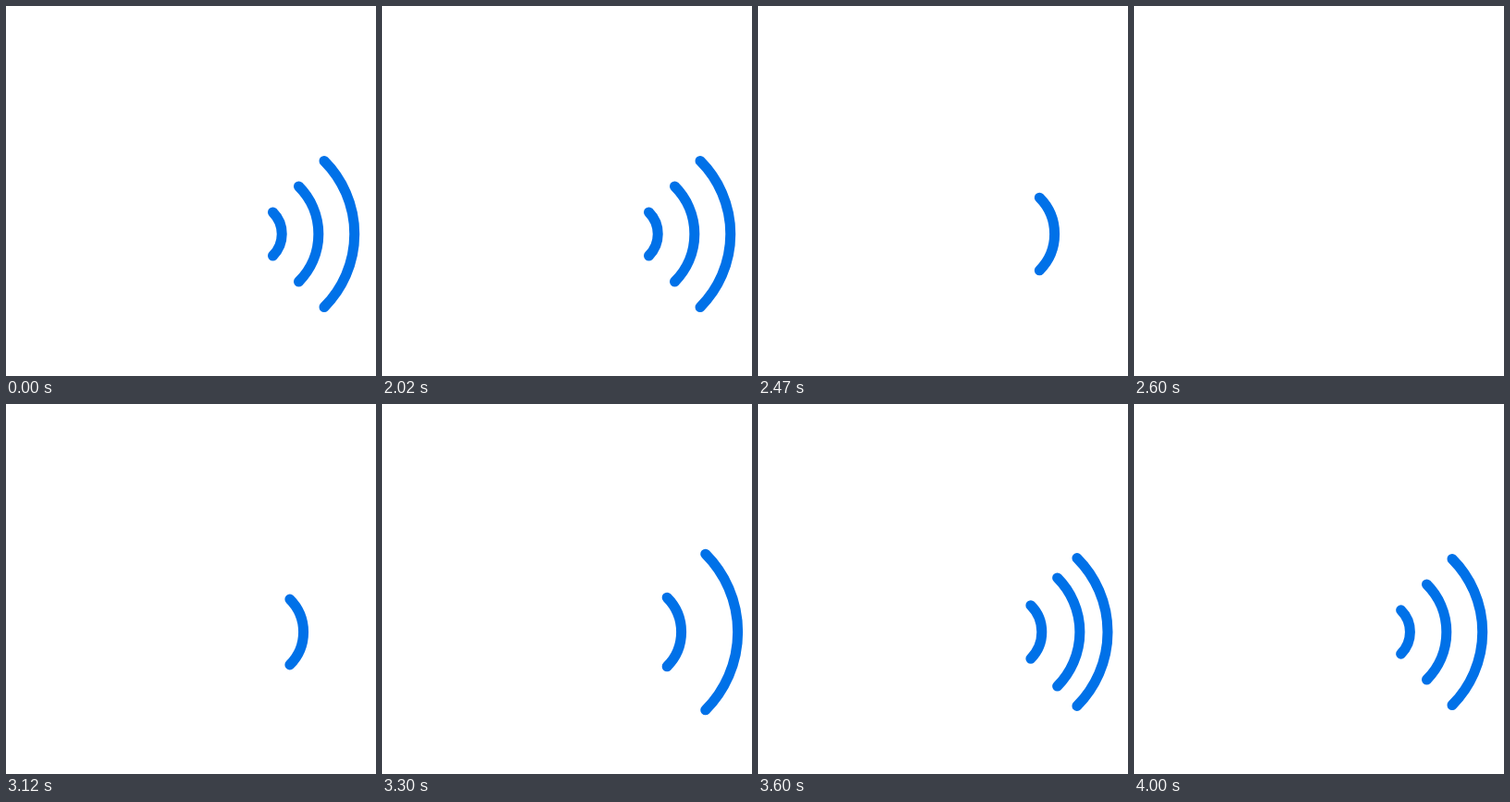
An HTML page that plays this animation: 400x400 px, repeating every 4020 ms.

```html
<!DOCTYPE html>
<html lang="en">
<head>
<meta charset="utf-8">
<title>Signal waves</title>
<style>
  html, body { margin: 0; width: 100%; height: 100%; overflow: hidden; background: #fff; }
  svg { display: block; width: 100%; height: 100%; }
  path { fill: none; stroke: #0071e8; stroke-width: 11; stroke-linecap: round; }
</style>
</head>
<body>
<svg viewBox="0 0 400 400"><path/><path/><path/></svg>
<script>
const LOOP = 4020, RISE = 240, SETTLE = 360;
const CX = 265, CY = 246.5;

// Sizes are half the height of each quarter-circle arc; times are in ms.
const waves = [
  { rest: 79,   grow: 17, leave: 2005, gone: 2260, enter: 3120, from: 35, peak: 87.5 },
  { rest: 51.5, grow: 35, leave: 2140, gone: 2430, enter: 3290, from: 35, peak: 60 },
  { rest: 23.5, grow: 56, leave: 2275, gone: 2600, enter: 3460, from: 13, peak: 32 }
];
const paths = document.querySelectorAll('path');
const progress = (t, start, end) => Math.min(1, Math.max(0, (t - start) / (end - start)));

function pose(w, t) {
  if (t < w.gone) {
    return { size: w.rest + w.grow * progress(t, w.leave, w.gone) ** 2.5, shift: 0 };
  }
  if (t < w.enter) return null;
  const top = w.enter + RISE;
  const left = (1 - progress(t, w.enter, top)) ** 2;
  if (t < top) return { size: w.peak - (w.peak - w.from) * left, shift: 6.5 * left };
  const p = 1 - (1 - progress(t, top, top + SETTLE)) ** 1.4;
  const excess = (1 + Math.cos(Math.PI * p)) / 2;
  return { size: w.rest + (w.peak - w.rest) * excess, shift: 0 };
}

function arc({ size, shift }) {
  const x = CX + shift + size, r = size * Math.SQRT2;
  return `M${x} ${CY - size}A${r} ${r} 0 0 1 ${x} ${CY + size}`;
}

function draw(t) {
  waves.forEach((w, i) => {
    const p = pose(w, t);
    paths[i].setAttribute('d', p ? arc(p) : '');
  });
}

const start = performance.now();
function tick() {
  draw((performance.now() - start) % LOOP);
  requestAnimationFrame(tick);
}
tick();
</script>
</body>
</html>
```
